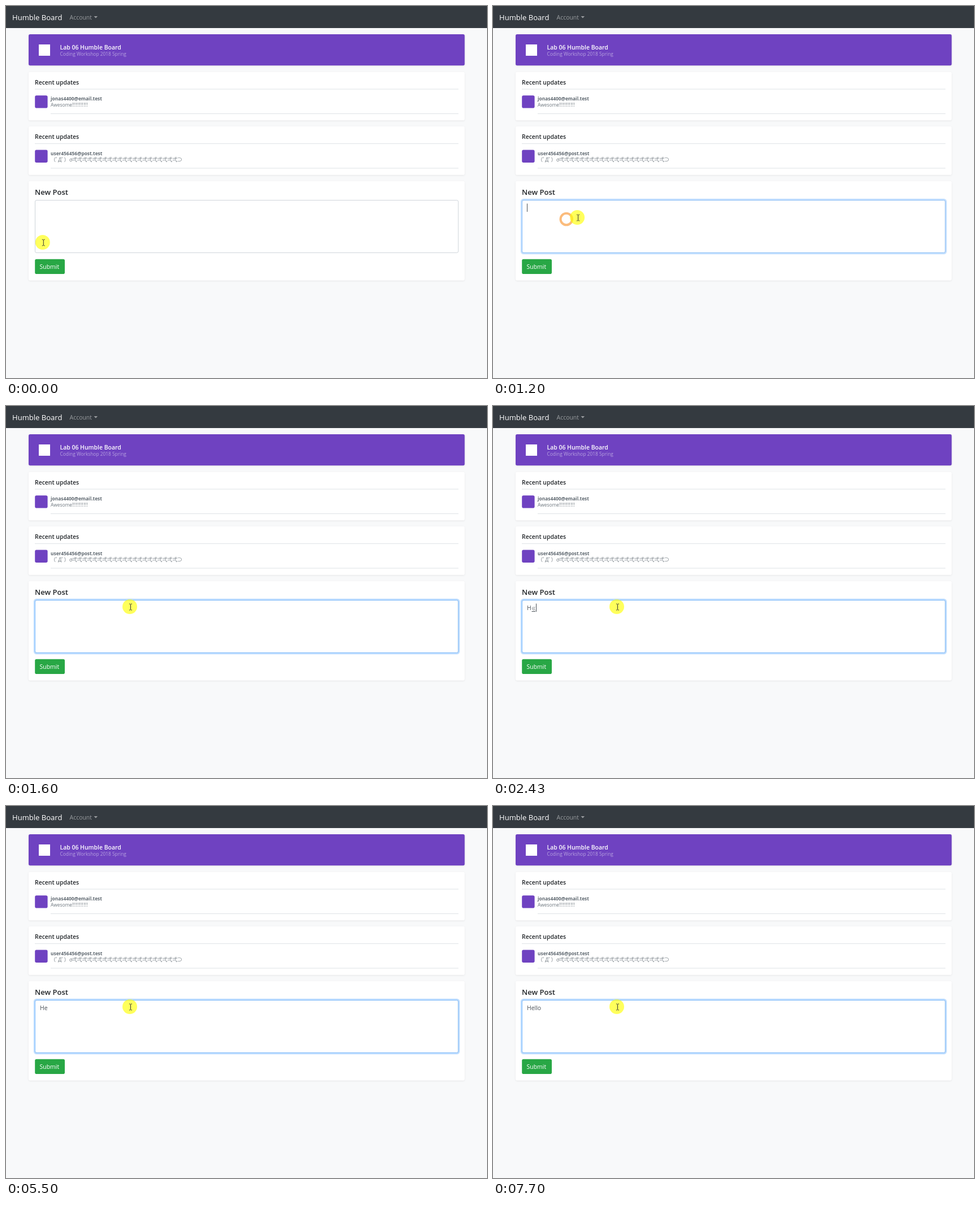
These frames come from a looping animation (851 px wide and 658 px high, 8 s). An HTML page:

```html
<!DOCTYPE html>
<html lang="en">
<head>
<meta charset="utf-8">
<title>Forum post</title>
<style>
html, body { margin: 0; width: 100%; height: 100%; overflow: hidden; background: #f8f9fa; }
svg { display: block; width: 851px; height: 658px; font: 10.45px "Open Sans", "Noto Sans CJK TC", "Noto Sans CJK JP", sans-serif; }
text { white-space: pre; }
.card { fill: #fff; filter: drop-shadow(0 1.4px 1.4px rgba(0, 0, 0, .075)); }
.purple { fill: #6f42c1; }
.rule { stroke: #dee2e6; }
.big { font-size: 13.05px; }
.small { font-size: 8.35px; fill: #6c757d; }
.semi { font-weight: 600; }
.bold { font-weight: 700; fill: #5f6870; }
.dark { fill: #212529; }
.white { fill: #fff; }
.typed { fill: #495057; }
</style>
</head>
<body>
<svg viewBox="0 0 851 658">
  <rect width="851" height="39" fill="#343a40"/>
  <text class="big white" x="11" y="24.7">Humble Board</text>
  <g fill="#999c9f">
    <text x="112.6" y="23.8">Account</text>
    <path d="M155.5 18h6.6l-3.3 3.4z"/>
  </g>

  <rect class="card" x="40" y="50" width="771.5" height="55.3" rx="2.8" style="fill:#6f42c1"/>
  <rect class="white" x="58" y="68" width="20" height="20"/>
  <text class="semi white" x="95.5" y="76.5">Lab 06 Humble Board</text>
  <text class="small" x="95.5" y="87.5" style="fill:#b7a1e0">Coding Workshop 2018 Spring</text>

  <g id="update">
    <rect class="card" x="40" y="116.7" width="771.5" height="85.6" rx="2.8"/>
    <text class="semi dark" x="51" y="138.8">Recent updates</text>
    <path class="rule" d="M51 147H800.5M79 190.5H800.5"/>
    <rect class="purple" x="51.2" y="158.2" width="22.4" height="22.4" rx="2.8"/>
  </g>
  <use href="#update" y="96.4"/>
  <text class="small bold" x="79" y="167.2">jonas4400@email.test</text>
  <text class="small" x="79" y="177.6">Awesome<tspan letter-spacing=".3">!!!!!!!!!!!</tspan></text>
  <text class="small bold" x="79" y="263.6">user456456@post.test</text>
  <text class="small" y="274.6" style="font-size:8.9px"><tspan x="79">（ﾟДﾟ）</tspan><tspan x="112">σ</tspan><tspan x="117" id="arm"></tspan><tspan x="303">⊃</tspan></text>

  <rect class="card" x="40" y="309.7" width="771.5" height="175.7" rx="2.8"/>
  <text class="big semi dark" x="51" y="334">New Post</text>
  <rect x="51.5" y="343.6" width="748.7" height="92.8" rx="2.5" fill="#fff" stroke="#ced4da"/>
  <g id="focus" fill="none">
    <rect x="50" y="342" width="751.7" height="96" rx="4" stroke="#007bff" stroke-opacity=".25" stroke-width="2.4"/>
    <rect x="51.5" y="343.6" width="748.7" height="92.8" rx="2.5" stroke="#80bdff"/>
  </g>
  <rect x="51.2" y="447.8" width="52.8" height="26.2" rx="2.8" fill="#28a745"/>
  <text class="white" x="59.6" y="464.8">Submit</text>

  <text id="post" class="typed" x="60" y="361"></text>
  <text id="glyph" class="typed" x="68" y="361"></text>
  <path id="underline" stroke="#495057"/>
  <path id="caret" d="M.5 349.5v14.5" stroke="#495057"/>

  <circle id="ring" cx="129.8" cy="377" fill="none" stroke="#faa550" stroke-width="4"/>
  <g id="pointer">
    <circle r="13" fill="#ff0" fill-opacity=".64"/>
    <path d="M-1 -5q2 0 2.5 1q.5 -1 2.5 -1M1.5 -4v9M-1 6q2 0 2.5 -1q.5 1 2.5 1" fill="none" stroke="#333"/>
  </g>
</svg>
<script>
const LOOP = 8000, STEP = 100 / 3, CLICK = 1070, BLINK = 530;
const $ = id => document.getElementById(id);
$('arm').textContent = '弌'.repeat(21);

// time, x, y
const path = [[37, 64.8, 418], [270, 130, 377], [1136, 130, 377], [1337, 187, 368], [1503, 219, 355]];

// time, text, composed glyph, glyph size, caret x, time the caret last lit up (none: hidden)
const edits = [
  [0, '', '', 0, 60],
  [1070, '', '', 0, 60, 1070],
  [2200, 'H', '', 0, 68, 2200],
  [2430, 'H', 'ㄍ', 8, 76, 2430],
  [3400, 'H', 'ㄍ', 8, 76, 3400],
  [3500, 'H', '去', 10.5, 79, 3500],
  [3600, 'H', '去', 10.5, 79, 3600],
  [4200, 'H', '去', 10.5, 79, 4200],
  [4330, 'H', 'ㄍ', 8, 76, 4330],
  [4730, 'H', '', 0, 68, 4730],
  [4870, 'H', '', 0, 68],
  [4970, 'He', '', 0, 74, 4970],
  [5670, 'Hel', '', 0, 77, 5670],
  [5800, 'Hell', '', 0, 80, 5800],
  [5970, 'Hello', '', 0, 86, 5970],
  [6100, 'Hellow', '', 0, 94, 6100],
  [6830, 'Hello', '', 0, 86, 6110]
];

const clamp = v => Math.min(1, Math.max(0, v));
const ease = v => v * v * (3 - 2 * v);

function pointerAt(t) {
  let i = path.findIndex(p => p[0] > t);
  if (i === 0) return path[0].slice(1);
  if (i < 0) return path[path.length - 1].slice(1);
  const [t0, x0, y0] = path[i - 1], [t1, x1, y1] = path[i];
  const linear = (t - t0) / (t1 - t0);
  const u = i === 1 ? ease(linear) : linear;
  return [x0 + (x1 - x0) * u, y0 + (y1 - y0) * u];
}

function draw(t) {
  const tick = t < 70 ? 0 : 70 + Math.floor((t - 63) / STEP) * STEP;
  $('pointer').setAttribute('transform', `translate(${pointerAt(tick)})`);

  const spread = (tick - CLICK) / BLINK;
  $('ring').setAttribute('r', 4 + 25 * clamp(spread));
  $('ring').setAttribute('opacity', spread < 0 ? 0 : 1 - clamp(spread));
  $('focus').setAttribute('opacity', clamp((tick - CLICK) / 150));

  const [, text, glyph, size, x, lit] = edits.filter(e => e[0] <= t).pop();
  $('post').textContent = text;
  $('glyph').textContent = glyph;
  $('glyph').style.fontSize = size + 'px';
  $('underline').setAttribute('d', glyph ? `M68.5 363.5H${x - 1}` : '');
  $('caret').setAttribute('transform', `translate(${x})`);
  const on = lit !== undefined && Math.floor((t - lit) / BLINK) % 2 === 0;
  $('caret').setAttribute('opacity', on ? 1 : 0);
}

const start = performance.now();
function frame() {
  draw((performance.now() - start) % LOOP);
  requestAnimationFrame(frame);
}
frame();
</script>
</body>
</html>
```
